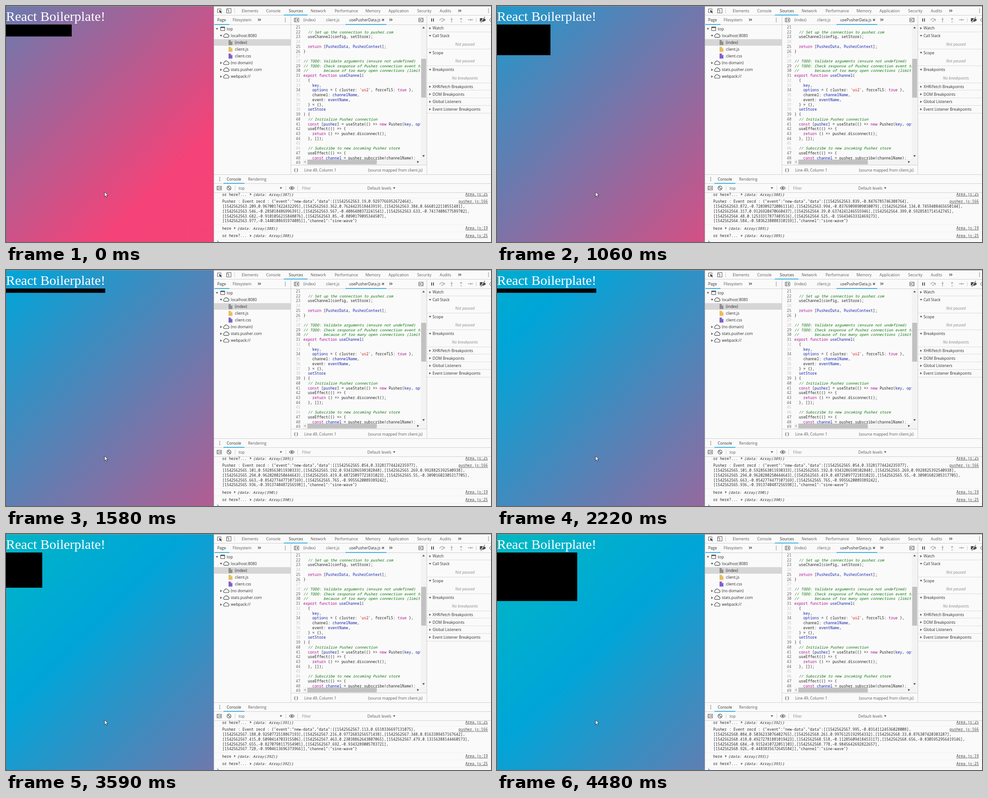
Write an HTML page that moves like this. It is 1070 by 523 pixels and loops after 4.87 s.

```html
<!DOCTYPE html>
<html lang="en">
<head>
<meta charset="utf-8">
<title>React Boilerplate</title>
<style>
  html, body { margin: 0; width: 100%; height: 100%; overflow: hidden; background: #fafafa; }
  svg { display: block; width: 100vw; height: 100vh; }
  text { font: 8.5px "Open Sans", "Noto Sans", sans-serif; fill: #5a5a5a; white-space: pre; }
  .dark { fill: #2b2b2b; }
  .dim { fill: #8c8c8c; }
  .bold { font-weight: bold; }
  .note { fill: #8c8c8c; font-style: italic; text-anchor: middle; }
  .end { text-anchor: end; }
  .code { font: 8.25px "Noto Sans Mono", "DejaVu Sans Mono", monospace; fill: #222; }
  .log { font: 8.28px "Noto Sans Mono", "DejaVu Sans Mono", monospace; fill: #2b2b2b; }
  .number { fill: #666; text-anchor: end; }
  .faint { fill: #c4c4c4; text-anchor: end; }
  .link { text-decoration: underline; text-anchor: end; fill: #444; }
  .object { font-style: italic; }
  .comment { fill: #007400; font-style: italic; }
  .keyword { fill: #aa0d91; }
  .string { fill: #c41a16; }
  .name { fill: #1320a8; }
  .title { font: 30px "Liberation Serif", "Times New Roman", serif; fill: #fff; }
</style>
</head>
<body>
<svg viewBox="0 0 1070 523" preserveAspectRatio="none">
  <defs>
    <linearGradient id="sky" gradientUnits="userSpaceOnUse">
      <stop offset="0" stop-color="#00dc9b"/>
      <stop offset=".33333" stop-color="#00a5d8"/>
      <stop offset=".66667" stop-color="#f54278"/>
      <stop offset="1" stop-color="#f2476f"/>
    </linearGradient>
    <clipPath id="codeClip"><rect x="629" y="42" width="286" height="298"/></clipPath>
    <clipPath id="logClip"><rect x="459" y="414" width="611" height="109"/></clipPath>
  </defs>
  <rect width="458" height="523" fill="url(#sky)"/>
  <path d="M.5 0V523" stroke="#777" stroke-opacity=".6"/>
  <text class="title" x="0" y="32.8">React Boilerplate!</text>
  <rect id="box" y="41"/>
  <path d="M217.3 412v10.6l2.5-2.3 1.7 4 1.7-.7-1.7-3.9h3.4z" fill="#fff" stroke="#222" stroke-width=".8"/>
  <g id="tools"></g>
  <g id="log" clip-path="url(#logClip)"></g>
  <path d="M0 .5H1070" stroke="#8e8e8e"/>
</svg>
<script>
const $ = id => document.getElementById(id);

// Every y given to these helpers is the vertical middle of the item.
const text = (x, y, str, cls = '') => `<text x="${x}" y="${y + 3}" class="${cls}">${str}</text>`;
const fill = (d, color = '#5a5a5a') => `<path d="${d}" fill="${color}"/>`;
const stroke = (d, color = '#5a5a5a', width = 1) =>
  `<path d="${d}" fill="none" stroke="${color}" stroke-width="${width}"/>`;
const rect = (x, y, w, h, color) => fill(`M${x} ${y}h${w}v${h}h${-w}z`, color);
const disc = (x, y, r, color) => `<circle cx="${x}" cy="${y}" r="${r}" fill="${color}"/>`;
const ring = (x, y, r, color, width) =>
  `<circle cx="${x}" cy="${y}" r="${r}" fill="none" stroke="${color}" stroke-width="${width}"/>`;
const right = (x, y, color, r = 2.6) => fill(`M${x - r * .7} ${y - r}v${2 * r}l${r * 1.5} ${-r}z`, color);
const down = (x, y, color, r = 2.6) => fill(`M${x - r} ${y - r * .7}h${2 * r}l${-r} ${r * 1.5}z`, color);
const dots = (x, y) => [-3.5, 0, 3.5].map(dy => rect(x - .8, y + dy - .8, 1.6, 1.6)).join('');
const chevrons = (x, y) => stroke(`M${x} ${y - 2.5}l2.5 2.5-2.5 2.5m3.5-5l2.5 2.5-2.5 2.5`, '#444', 1.1);
const cloud = (x, y) =>
  stroke(`M${x - 4} ${y + 3.6}a2.6 2.6 0 0 1-.3-5.1a4 4 0 0 1 7.4-.7a3 3 0 0 1 1 5.8z`, '#444', 1.1);
const file = (x, y, color) =>
  fill(`M${x - 4} ${y - 5.5}h5l3.5 3.5v7.5h-8.5z`, color) + fill(`M${x + 1} ${y - 5.5}v3.5h3.5z`, '#fffa');
const panelIcon = (x, y, flip = 1) =>
  stroke(`M${x - 5} ${y - 4}h10v8h-10zM${x - 2.5 * flip} ${y - 4}v8`) +
  fill(`M${x + 3 * flip} ${y - 2.3}v4.6l${-3.5 * flip} -2.3z`);
const underline = (x, y, w) => rect(x, y - .7, w, 1.5, '#0aa2e0');

function frameLines() {
  const across = [20.5, 373.5, 393.5, 413.5].map(y => `M459 ${y}H1070`).join('');
  const upright = 'M628.5 21V373M928.5 21V373M504.5 5v11M1037.5 26v10M505.5 398v11M617.5 398v11M643.5 398v11';
  return rect(458, 0, 612, 523, '#fafafa') +
    stroke(across + upright + 'M459 41.5H1070M629 352.5H928', '#cfcfcf') +
    stroke('M458.5 0V523', '#a8a8a8');
}

function topBar() {
  const tabs = { Elements: 520, Console: 574, Sources: 624, Network: 672, Performance: 725,
    Memory: 793, Application: 844, Security: 907, Audits: 957 };
  const inspect = stroke('M474.5 9V6.5h-8v8h3') +
    fill('M470 9l6.5 2.5-2.5 1.2 2.3 2.3-1.3 1.3-2.3-2.3-1.2 2z', '#444');
  const device = stroke('M487 9V5.5h9.5v10h-4M486.5 8.500h5v7h-5z');
  return inspect + device + underline(613, 20, 52) +
    Object.entries(tabs).map(([name, x]) => text(x, 11, name, name == 'Sources' ? 'dark' : '')).join('') +
    chevrons(998, 10.5) + dots(1064.5, 10.5);
}

function sourcesBar() {
  return text(466, 31, 'Page', 'dark') + underline(460, 41, 33) +
    text(500, 31, 'Filesystem') + chevrons(556, 30.5) + dots(616, 31) +
    panelIcon(641, 31) + text(656, 31, '(index)') + text(706, 31, 'client.js') +
    text(757, 31, 'usePusherData.js', 'dark') + underline(749, 41, 90) +
    stroke('M829.5 28.5l4.5 4.5m0-4.5l-4.5 4.5', '#444', 1.1) +
    chevrons(846, 30.5) + panelIcon(915.5, 31, -1);
}

function debuggerButtons() {
  const grey = '#aaa';
  const pause = rect(938, 27.5, 2, 7, '#555') + rect(942, 27.5, 2, 7, '#555');
  const stepOver = stroke('M957 32a5 5 0 0 1 9.5-1', grey, 1.5) + fill('M968 28v4.5h-4.5z', grey) + disc(962, 33.5, 1.5, grey);
  const stepIn = stroke('M983 26v5', grey, 1.4) + down(983, 31, grey) + disc(983, 35, 1.2, grey);
  const stepOut = stroke('M1004 30v-2', grey, 1.4) + fill('M1001.3 30h5.4l-2.7-4z', grey) + disc(1004, 35, 1.2, grey);
  const step = stroke('M1019 30.5h6', grey, 1.4) + right(1026, 30.5, grey) + disc(1029, 30.5, 1.2, grey);
  const deactivate = fill('M1045.5 27h9l4.5 3.7-4.5 3.8h-9z', '#444') +
    stroke('M1047 37l9-13', '#fafafa', 2.6) + stroke('M1047.5 37l9-13', '#444', 1.1);
  return pause + stepOver + stepIn + stepOut + step + deactivate + stroke('M1070 27l-2.5 2v4l2.5 2', '#666');
}

function fileTree() {
  const files = [['(index)', '#8f8f8f'], ['client.js', '#e8bd5a'], ['client.css', '#8060c8']];
  const domains = ['(no domain)', 'stats.pusher.com', 'webpack://'];
  const row = i => 50.7 + 15.1 * i;
  const domain = (name, i, arrow) => arrow(474.5, row(i)) + cloud(486, row(i)) + text(496, row(i), name, 'dark');
  return rect(459, 73.5, 169, 14.5, '#d6d6d6') +
    down(465.5, row(0)) + stroke('M473.5 47h9v7.5h-9z', '#444') + rect(473, 46, 10, 2.5, '#444') +
    text(487, row(0), 'top', 'dark') + domain('localhost:8080', 1, down) +
    files.map(([name, color], i) => file(495, row(i + 2), color) + text(505, row(i + 2), name, 'dark')).join('') +
    domains.map((name, i) => domain(name, i + 5, right)).join('');
}

// A leading ! greys the line number, a leading @ marks a declared name.
const SOURCE = `
  // Set up the connection to pusher.com
  useChannel(config, setStore);
!
  return [@PusherData, @PusherContext];
}
!
!// TODO: Validate arguments (ensure not undefined)
// TODO: Check response of Pusher connection event to
//       because of too many open connections (limit
export function @useChannel(
!  {
!    @key,
    @options = { cluster: 'us2', forceTLS: true },
!    channel: @channelName,
!    event: @eventName,
!  } = {},
!  @setStore
) {
  // Initialize Pusher connection
  const [@pusher] = useState(() => new Pusher(@key, @options));
  useEffect(() => {
    return () => pusher.disconnect();
  }, []);
!
!  // Subscribe to new incoming Pusher store
  useEffect(() => {
    const @channel = pusher.subscribe(channelName);
`.split('\n');

function highlight(line) {
  const span = (cls, s) => `<tspan class="${cls}">${s}</tspan>`;
  return line.split(/(\/\/.*|'[^']*'|@\w+|\b(?:const|return|export|function|new|true)\b)/).map((part, i) => {
    if (i % 2 == 0) return part;
    if (part[0] == '/') return span('comment', part);
    if (part[0] == "'") return span('string', part);
    return part[0] == '@' ? span('name', part.slice(1)) : span('keyword', part);
  }).join('');
}

function editor() {
  const y = i => 46.9 + 10.73 * i;
  const numbers = SOURCE.map((line, i) => text(649.5, y(i), 21 + i, 'code ' + (line[0] == '!' ? 'faint' : 'number')));
  const lines = SOURCE.map((line, i) => text(656, y(i), highlight(line.replace('!', '')), 'code'));
  return numbers.join('') + `<g clip-path="url(#codeClip)">${lines.join('')}</g>` +
    rect(915, 42, 13, 298, '#f3f3f3') + rect(655, 340, 273, 12, '#f3f3f3') +
    rect(916, 117, 11, 86, '#c1c1c1') + rect(665, 340.5, 153, 10.5, '#c1c1c1') +
    fill('M918.5 49.5h5.4l-2.7-3.5z', '#444') + down(921.2, 332.5, '#444') +
    fill('M661 343v5.2l-3.5-2.6z', '#aaa') + right(909, 345.5, '#444') +
    text(635.5, 362.5, '{ }', 'bold') +
    text(658, 363.5, 'Line 49, Column 1') + text(919, 363.5, '(source mapped from client.js)', 'end');
}

function debuggerPane() {
  const sections = [['Watch'], ['Call Stack', 'Not paused'], ['Scope', 'Not paused'], ['Breakpoints', 'No breakpoints'],
    ['XHR/fetch Breakpoints'], ['DOM Breakpoints'], ['Global Listeners'], ['Event Listener Breakpoints']];
  let y = 49.3;
  return sections.map(([name, note]) => {
    const height = note ? 37.6 : 16.7;
    const section = (note ? down : right)(935.5, y, '#5a5a5a') + text(941, y, name, 'dark') +
      (note ? text(1012.5, y + 18.8, note, 'note') : '') +
      stroke(`M929 ${Math.floor(y + height - 8.5) + .5}H1070`, '#dcdcdc');
    y += height;
    return section;
  }).join('');
}

function drawerBars() {
  return dots(471.5, 383.5) + text(487, 383.5, 'Console', 'dark') + underline(480, 393, 46) +
    text(534, 383.5, 'Rendering') +
    panelIcon(470.5, 403.5) + ring(492, 403.5, 4.3, '#555', 1.3) + stroke('M489 400.5l6 6', '#555', 1.3) +
    text(513, 403.8, 'top') + down(606.5, 403.5) +
    stroke('M625 403.5q5.5-7 11 0q-5.5 7-11 0z', '#555', 1.2) + disc(630.5, 403.5, 2, '#555') +
    text(653, 403.8, 'Filter', 'dim') + text(797, 403.8, 'Default levels') + down(856.5, 403.5);
}

$('tools').innerHTML = [frameLines, topBar, sourcesBar, debuggerButtons, fileTree, editor, debuggerPane, drawerBars]
  .map(draw => draw()).join('');

const EVENTS = [
  { at: 0, firstSample: 563.19, width: 145, height: 26.5 },
  { at: 520, firstSample: 563.839, width: 118, height: 68 },
  { at: 1450, firstSample: 565.054, width: 219, height: 9.5 },
  { at: 2470, firstSample: 566.205, width: 69.5, height: 18 },
  { at: 3280, firstSample: 567.113, width: 80, height: 78 },
  { at: 4170, firstSample: 567.995, width: 177, height: 107.5 }
];

// Ten irregularly timed readings of a one-hertz sine wave.
function samples(firstSample, seed) {
  let ms = Math.round(firstSample * 1000);
  return Array.from({ length: 10 }, () => {
    const time = (1542562e6 + ms) / 1000;
    seed = (seed * 16807 + 11) % 2147483647;
    ms += 5 + Math.floor(180 * seed / 2147483647);
    return `[${time},${Math.sin(2 * Math.PI * time)}]`;
  });
}

function logRow(y, label, arrowX, count, link) {
  return text(477, y, label, 'log') + right(arrowX, y - .3, '#6e6e6e') +
    text(arrowX + 5, y, `{data: Array(${count})}`, 'log object') + text(1063, y - .5, link, 'log link');
}

function logLines(index) {
  const points = samples(EVENTS[index].firstSample, 9973 * (index + 1));
  const rows = [[0, 1], [1, 4], [4, 7], [7, 9], [9, 10]].map(([a, b]) => points.slice(a, b).join(','));
  const message = `Pusher : Event recd : {"event":"new-data","data":[${rows.join(',\n')}],"channel":"sine-wave"}`;
  const count = 388 + index;
  return stroke('M459 425.5H1070M459 484.5H1070M459 500.5H1070M459 517.5H1070', '#f0f0f0') +
    logRow(417.5, 'or here?...', 540, count - 1, 'Area.js:25') +
    message.split('\n').map((line, i) => text(477, 433.4 + 10.75 * i, line, 'log')).join('') +
    text(1063, 433.4, 'pusher.js:166', 'log link') +
    logRow(492.6, 'here', 505, count, 'Area.js:19') +
    logRow(509.4, 'or here?...', 540, count, 'Area.js:25') +
    stroke('M466 520l3 3-3 3', '#3b82e8', 1.3);
}

// CSS "ease": cubic-bezier(.25, .1, .25, 1)
function ease(x) {
  const bezier = (s, a, b) => 3 * (1 - s) ** 2 * s * a + 3 * (1 - s) * s * s * b + s ** 3;
  let low = 0, high = 1;
  for (let i = 0; i < 24; i++) {
    const mid = (low + high) / 2;
    if (bezier(mid, .25, .25) < x) low = mid; else high = mid;
  }
  return bezier(low, .1, 1);
}

// The backdrop is four times the pane in each direction and slides sideways behind it.
function moveSky(t) {
  const slide = 1374 * (1 - ease((1200 + t) / 7500));
  const start = -(784.5 + slide) / 2, end = start + 3924 / 2;
  Object.entries({ x1: start, y1: start, x2: end, y2: end }).forEach(([k, v]) => $('sky').setAttribute(k, v));
}

const LOOP = 4870, TICK = 130;
let shown = -1;
function render() {
  const t = performance.now() % LOOP;
  moveSky(Math.floor(t / TICK) * TICK);
  const index = EVENTS.findLastIndex(event => event.at <= t);
  if (index != shown) {
    shown = index;
    $('box').setAttribute('width', EVENTS[index].width);
    $('box').setAttribute('height', EVENTS[index].height);
    $('log').innerHTML = logLines(index);
  }
  requestAnimationFrame(render);
}
render();
</script>
</body>
</html>
```
